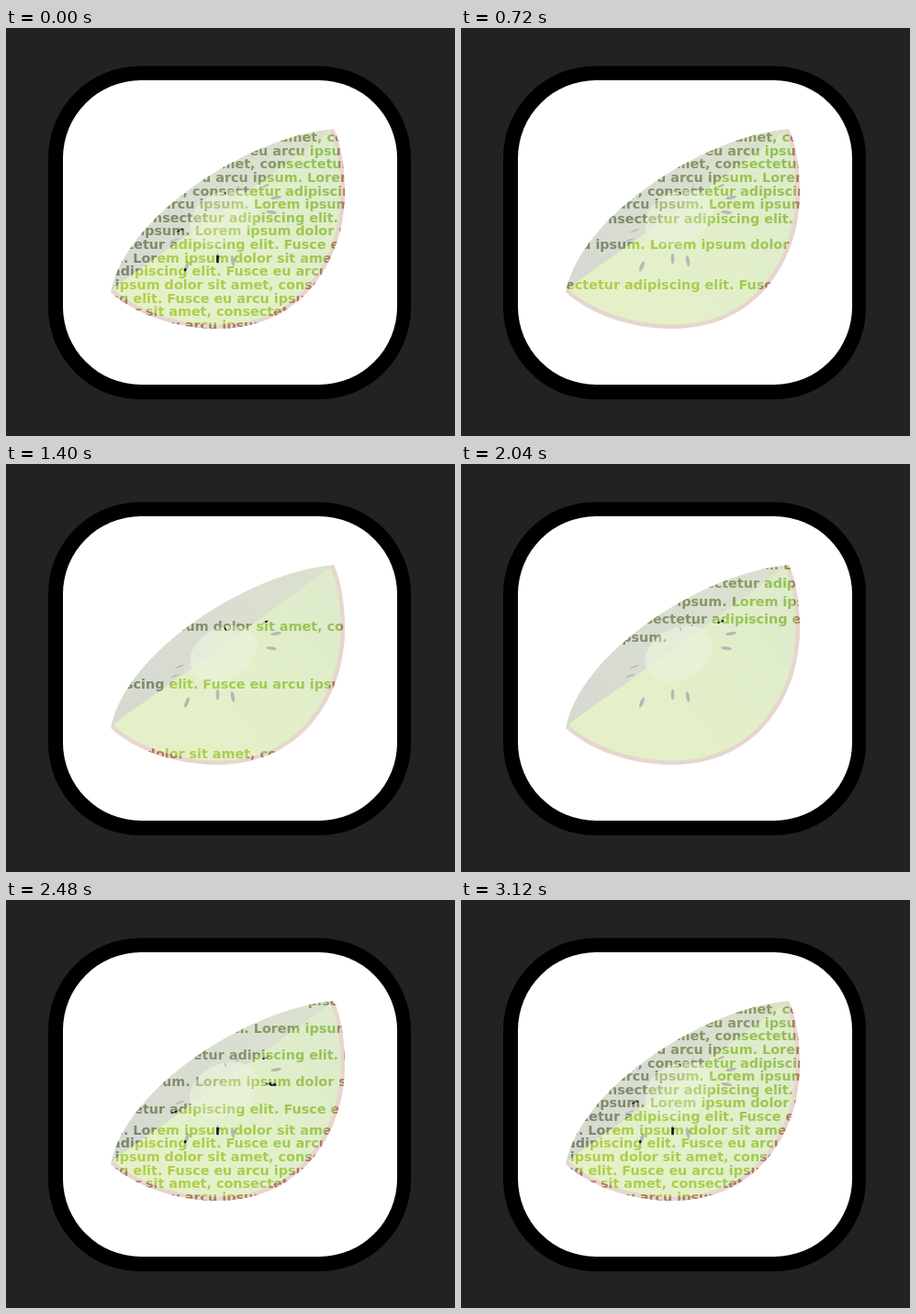
Animation, 489 px wide and 445 px high, one loop 3160 ms. Source, as an HTML page:

```html
<!DOCTYPE html>
<html lang="en">
<head>
<meta charset="utf-8">
<title>Falling text slice</title>
<style>
  html, body { margin: 0; width: 100%; height: 100%; overflow: hidden; background: #232124; }
  svg { display: block; width: 489px; height: 445px; }
  text { font: bold 14.35px "DejaVu Sans", Verdana, sans-serif; white-space: pre; }
</style>
</head>
<body>
<svg viewBox="0 0 489 445">
  <defs>
    <linearGradient id="flesh" gradientUnits="userSpaceOnUse" x1="150" y1="310" x2="350" y2="150">
      <stop offset="0" stop-color="#aed04b"/>
      <stop offset=".55" stop-color="#a2cc50"/>
      <stop offset="1" stop-color="#94bf58"/>
    </linearGradient>
    <linearGradient id="shade" gradientUnits="userSpaceOnUse" x1="115" y1="280" x2="355" y2="112">
      <stop offset="0" stop-color="#77836a"/>
      <stop offset=".5" stop-color="#83926b"/>
      <stop offset="1" stop-color="#8a9d5c"/>
    </linearGradient>
    <path id="slice" d="M357 110C264 118 130 205 114 288C140 312 185 328 230 328C325 328 369 250 369 180C369 150 364 125 357 110Z"/>
    <clipPath id="sliceClip"><use href="#slice"/></clipPath>
    <clipPath id="textClip"></clipPath>
    <g id="art" clip-path="url(#sliceClip)">
      <use href="#slice" fill="url(#flesh)"/>
      <path d="M357 110C264 118 130 205 114 288L122 280Q235 200 357 110Z" fill="url(#shade)"/>
      <ellipse cx="237" cy="207" rx="39" ry="28" transform="rotate(-28 237 207)" fill="#bcd68c" opacity=".7"/>
      <path d="M114 288C140 312 185 328 230 328C325 328 369 250 369 180C369 150 364 125 357 110" fill="none" stroke="#ad7a60" stroke-width="9"/>
      <g id="seeds" fill="#10160f"></g>
    </g>
  </defs>
  <rect width="489" height="445" fill="#232124"/>
  <rect x="46" y="41.5" width="395" height="363.5" rx="100" fill="#000"/>
  <rect x="62" y="57" width="364" height="332" rx="85" fill="#fff"/>
  <use href="#art" opacity=".3"/>
  <g clip-path="url(#textClip)"><use href="#art"/></g>
</svg>
<script>
const LOOP = 3160, ENTER = 1740, PITCH = 14.64, BASELINE = 124;
const NS = "http://www.w3.org/2000/svg";
const words = "Lorem ipsum dolor sit amet, consectetur adipiscing elit. Fusce eu arcu ipsum.".split(" ");

// first word, left edge, time the line starts to drop
const rows = [
  [0, 116, 1080], [6, 90, 991], [0, 43, 911], [6, 28, 852], [2, 79, 773], [8, 94, 712],
  [4, 90, 680], [9, 81, 605], [5, 77, 522], [11, 79, 450], [5, 14, 400], [0, 63, 345],
  [6, 51, 285], [2, 105, 225], [7, 82, 170], [3, 95, 110], [9, 105, 50]
];
const LAST = rows.length - 1;

// x, y, long radius, short radius, angle
const seeds = [
  [197, 260, 6, 2, 112], [230.5, 251.5, 6, 1.8, 90], [247, 254, 6, 2, 80],
  [294, 185, 6, 1.8, -10], [289, 201, 6, 1.8, 6], [283, 172, 4, 1.1, -25],
  [252, 175, 3, .8, -55], [239, 180, 2.5, .8, 70], [189, 221, 5, .8, -22], [184, 231, 5, .8, -18]
];

function add(parent, tag, attrs) {
  const node = document.createElementNS(NS, tag);
  for (const key in attrs) node.setAttribute(key, attrs[key]);
  return document.getElementById(parent).appendChild(node);
}

for (const [cx, cy, rx, ry, angle] of seeds)
  add("seeds", "ellipse", { cx, cy, rx, ry, transform: `rotate(${angle} ${cx} ${cy})` });

const lines = rows.map(([first, x], i) => {
  const line = add("textClip", "text", { x, y: BASELINE });
  const count = i === LAST ? 3 : 11;
  line.textContent = Array.from({ length: count }, (_, k) => words[(first + k) % words.length]).join(" ");
  return line;
});

// time, offset of the lowest line, extra lag per line above it
const entry = [[ENTER, -233, 2], [2040, -165, 5], [2480, 110, 14.8], [3110, 236.8, 14.8]];

function entryState(t) {
  const k = Math.max(1, entry.findIndex(key => key[0] >= t));
  const [t0, p0, q0] = entry[k - 1], [t1, p1, q1] = entry[k];
  const u = (t - t0) / (t1 - t0);
  return [p0 + (p1 - p0) * u, q0 + (q1 - q0) * u];
}

function offset(i, t) {
  if (t >= entry[3][0]) return 0;
  if (t < ENTER) {
    const fall = Math.max(0, t - rows[i][2]);
    return (5.6 + .7 * i) * 1e-4 * fall * fall;
  }
  const [lead, lag] = entryState(t);
  return Math.min(0, lead - lag * (LAST - i));
}

function draw(now) {
  const t = now % LOOP;
  lines.forEach((line, i) => line.setAttribute("y", (BASELINE + PITCH * i + offset(i, t)).toFixed(2)));
}

const start = performance.now();
function tick() {
  draw(performance.now() - start);
  requestAnimationFrame(tick);
}
tick();
</script>
</body>
</html>
```
